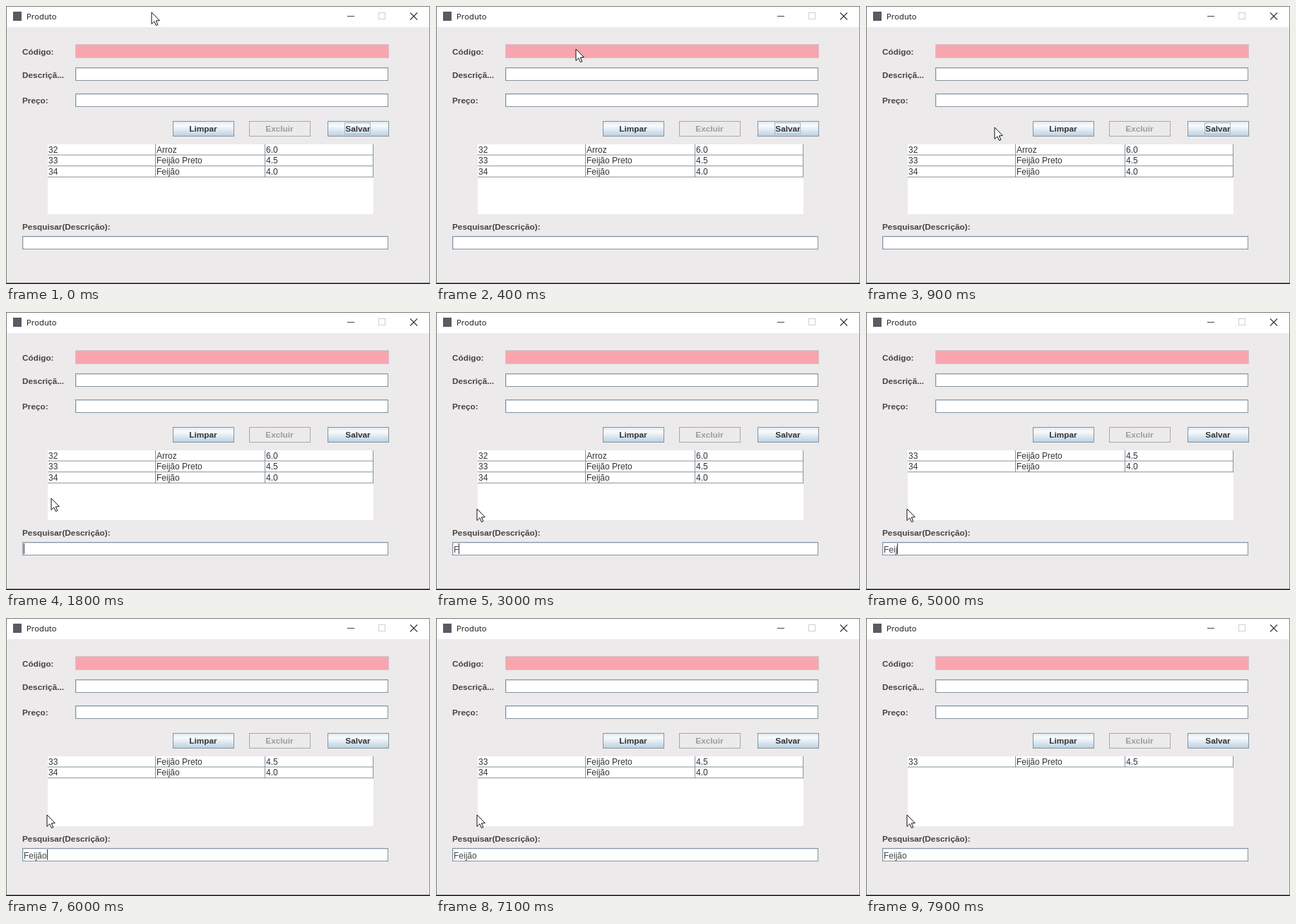
An HTML page with a canvas for the animation above (8 s loop, 600 by 394 pixels).

```html
<!DOCTYPE html>
<html lang="pt">
<head>
<meta charset="utf-8">
<title>Produto</title>
<style>
html, body { margin: 0; width: 100%; height: 100%; overflow: hidden; background: #eceaeb; }
canvas { display: block; }
</style>
</head>
<body>
<canvas id="stage" width="600" height="394"></canvas>
<script>
const ctx = document.getElementById('stage').getContext('2d');
const LOOP = 8000, STEP = 100;
const EDGE = '#8494a0';
const BOLD = 'bold 11.8px "Liberation Sans", Arial, sans-serif';
const PLAIN = '12px "Liberation Sans", Arial, sans-serif';
const TITLE = '11.3px "Open Sans", "Noto Sans", sans-serif';

const products = [
  ['32', 'Arroz', '6.0'],
  ['33', 'Feijão Preto', '4.5'],
  ['34', 'Feijão', '4.0']
];

// [time, value] tracks: each value holds until the next entry
const typed = [[0, ''], [3000, 'F'], [3400, 'Fe'], [3700, 'Fei'], [4700, 'Feij'],
  [5500, 'Feijã'], [5600, 'Feijão'], [6300, 'Feijão ']];
const filter = [[0, ''], [3100, 'Fei'], [7400, 'Feijão ']];
const caret = [[0, false], [1500, true], [2100, false], [2600, true], [4200, false],
  [4700, true], [5300, false], [5500, true], [6100, false], [6300, true],
  [6900, false], [7400, true], [7900, false]];
const FOCUS_AT = 1500;

// [time, x, y] of the pointer tip
const path = [[0, 206, 9], [100, 206, 10], [900, 182, 172], [1300, 66, 332],
  [1500, 66, 332], [1800, 64, 264], [2200, 58, 279]];

function at(track, t) {
  let value = track[0][1];
  for (const [time, v] of track) if (t >= time) value = v;
  return value;
}

function pointer(t) {
  const i = path.findIndex(p => p[0] > t);
  if (i < 0) return path[path.length - 1].slice(1);
  const [t0, x0, y0] = path[i - 1], [t1, x1, y1] = path[i];
  const k = (t - t0) / (t1 - t0);
  const e = k * k * (3 - 2 * k);
  return [Math.round(x0 + (x1 - x0) * e), Math.round(y0 + (y1 - y0) * e)];
}

function rect(x, y, w, h, fill) {
  ctx.fillStyle = fill;
  ctx.fillRect(x, y, w, h);
}

function box(x, y, w, h, fill, stroke) {
  rect(x, y, w, h, fill);
  ctx.strokeStyle = stroke;
  ctx.lineWidth = 1;
  ctx.strokeRect(x + 0.5, y + 0.5, w - 1, h - 1);
}

function text(s, x, y, font = BOLD, color = '#444', align = 'left') {
  ctx.font = font;
  ctx.fillStyle = color;
  ctx.textAlign = align;
  ctx.fillText(s, x, y);
}

function line(color, width, ...points) {
  ctx.strokeStyle = color;
  ctx.lineWidth = width;
  ctx.beginPath();
  points.forEach(([x, y], i) => i ? ctx.lineTo(x, y) : ctx.moveTo(x, y));
  ctx.stroke();
}

function field(x, y, w, h) {
  box(x, y, w, h, '#fff', EDGE);
  rect(x + 1, y + 1, w - 2, 1, '#dbe3ea');
  rect(x + 1, y + 1, 1, h - 2, '#dbe3ea');
}

function button(label, x, enabled) {
  let fill = '#ecebec';
  if (enabled) {
    fill = ctx.createLinearGradient(0, 163, 0, 185);
    fill.addColorStop(0, '#dde8f3');
    fill.addColorStop(0.3, '#f8fbfd');
    fill.addColorStop(0.5, '#e6eef6');
    fill.addColorStop(1, '#b8cfe0');
  }
  box(x, 163, 87, 22, fill, enabled ? EDGE : '#a8a8a8');
  text(label, x + 43, 178, BOLD, enabled ? '#333' : '#9c9c9c', 'center');
}

function drawWindow() {
  rect(0, 0, 600, 394, '#eceaeb');
  rect(0, 0, 600, 30, '#fff');
  rect(0, 0, 600, 1, '#777');
  rect(0, 0, 1, 394, '#777');
  rect(599, 0, 1, 394, '#8a8a8a');
  rect(0, 392, 600, 1, '#777');
  rect(0, 393, 600, 1, '#151515');

  rect(10, 8, 12, 13, '#5d5862');
  text('Produto', 29, 19, TITLE, '#111');
  line('#444', 1, [483, 14.5], [493, 14.5]);
  ctx.strokeStyle = '#d0d0d0';
  ctx.strokeRect(527.5, 9.5, 9, 9);
  line('#333', 1.1, [572, 9.5], [582, 19.5]);
  line('#333', 1.1, [582, 9.5], [572, 19.5]);
}

function drawForm(focused) {
  text('Código:', 23, 69);
  text('Descriçã...', 23, 102);
  text('Preço:', 23, 138);
  text('Pesquisar(Descrição):', 23, 317);
  box(98, 54, 444, 20, '#f9a5af', '#d3c3cc');
  field(98, 87, 443, 19);
  field(98, 124, 443, 19);
  field(23, 326, 518, 19);
  button('Limpar', 236, true);
  button('Excluir', 344, false);
  button('Salvar', 455, true);
  if (!focused) {
    ctx.strokeStyle = '#a3b8cc';
    ctx.lineWidth = 1;
    ctx.strokeRect(479.5, 165.5, 36, 16);
  }
}

function drawTable(query) {
  rect(59, 196, 461, 99, '#fff');
  const rows = products.filter(p => p[1].startsWith(query));
  const rowEnd = i => 195 + 15.6 * (i + 1);
  rows.forEach((row, i) => {
    const bottom = rowEnd(i);
    row.forEach((cell, c) => text(cell, [60, 213, 368][c], bottom - 3, PLAIN, '#333'));
    rect(59, bottom, 461, 1, EDGE);
  });
  const height = rowEnd(rows.length - 1) - 195;
  for (const x of [211, 366, 519]) rect(x, 196, 1, height, EDGE);
}

function drawSearch(value, showCaret) {
  text(value, 25, 340.5, PLAIN, '#444');
  if (showCaret) rect(Math.round(25 + ctx.measureText(value).width), 328, 1, 15, '#333');
}

function drawPointer(x, y) {
  if (x > 23 && x < 541 && y > 326 && y < 345) {
    line('#222', 1, [x + 0.5, y - 8], [x + 0.5, y + 8]);
    line('#222', 1, [x - 2, y - 8.5], [x + 3, y - 8.5]);
    line('#222', 1, [x - 2, y + 8.5], [x + 3, y + 8.5]);
    return;
  }
  const shape = [[0, 0], [0, 16.5], [3.8, 12.9], [6.5, 18.6], [8.9, 17.5], [6.3, 12], [11.3, 11.6]];
  ctx.beginPath();
  for (const [dx, dy] of shape) ctx.lineTo(x + dx, y + dy);
  ctx.closePath();
  ctx.fillStyle = '#fff';
  ctx.fill();
  ctx.strokeStyle = '#111';
  ctx.lineWidth = 1;
  ctx.stroke();
}

function draw(now) {
  const t = Math.floor((now % LOOP) / STEP) * STEP;
  drawWindow();
  drawForm(t >= FOCUS_AT);
  drawTable(at(filter, t));
  drawSearch(at(typed, t), at(caret, t));
  drawPointer(...pointer(t));
}

let start;
function tick(now) {
  if (start === undefined) start = now;
  draw(Math.max(0, now - start));
  requestAnimationFrame(tick);
}
draw(0);
requestAnimationFrame(tick);
</script>
</body>
</html>
```
